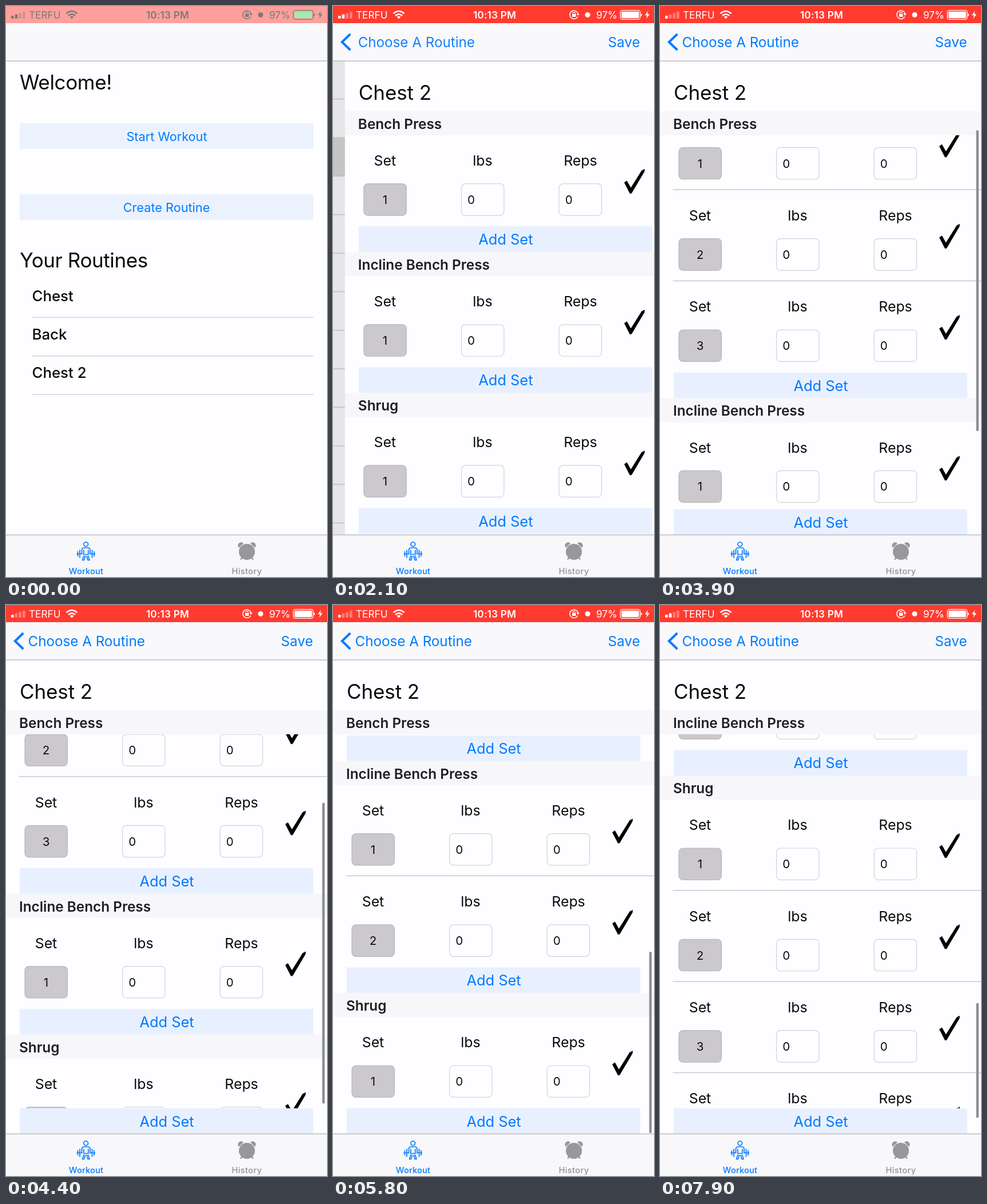
Animation, 561 px wide and 998 px high, one loop 8000 ms. Source, as an HTML page:

```html
<!DOCTYPE html>
<html lang="en">
<head>
<meta charset="utf-8">
<title>Workout tracker</title>
<style>
  html, body { margin: 0; width: 100%; height: 100%; overflow: hidden; background: #fefdff; }
  svg { display: block; }
  #stage { position: absolute; left: 0; top: 0; }
  text { font-family: Inter, Roboto, "Liberation Sans", sans-serif; white-space: pre; }
</style>
</head>
<body>
<svg id="stage" width="561" height="998" viewBox="0 0 561 998"></svg>
<script>
const W = 561, LOOP = 8000, STEP = 100;
const PAGE = '#fefdff', TINT = '#007aff', INK = '#0a0a0c', LINE = '#d3d2d6', BAR = '#f9f8fb';

// markup helpers
const text = (s, x, y, size, o = {}) =>
  `<text x="${x}" y="${y}" font-size="${size}" fill="${o.fill || INK}" font-weight="${o.weight || 400}"` +
  ` text-anchor="${o.anchor || 'start'}" letter-spacing="${o.gap || 0}"${o.id ? ` id="${o.id}"` : ''}>${s}</text>`;
const rect = (x, y, w, h, fill, extra = '') =>
  `<rect x="${x}" y="${y}" width="${w}" height="${h}" fill="${fill}" ${extra}/>`;
const rule = (x, y, x2 = W, color = LINE) => rect(x, y - 0.75, x2 - x, 1.5, color);
const group = (id, body, extra = '') => `<g id="${id}" ${extra}>${body}</g>`;
const mid = { anchor: 'middle' };
const blueMid = { anchor: 'middle', fill: TINT };

// timing helpers
const clamp = (v, a, b) => Math.min(b, Math.max(a, v));
const ease = k => k * k * (3 - 2 * k);
const ramp = (t, start, dur) => ease(clamp((t - start) / dur, 0, 1));
const push = (t, start) => {
  const x = Math.max(0, t - start) * 0.017;
  const p = 1 - (1 + x) * Math.exp(-x);
  return p > 0.995 ? 1 : p;
};
const along = (keys, t) => {
  if (t <= keys[0][0]) return keys[0][1];
  for (let i = 1; i < keys.length; i++) {
    const [a, u] = keys[i - 1], [b, v] = keys[i];
    if (t <= b) return u + (v - u) * (t - a) / (b - a);
  }
  return keys[keys.length - 1][1];
};

// status bar
function status(id, back, ink, fill) {
  const bars = [0, 1, 2, 3].map(i =>
    rect(9 + i * 6.7, 17 - i * 2.4, 4.6, 5 + i * 2.4, ink, `rx="1" class="bar${i}" opacity="${i < 2 ? 1 : 0.35}"`)).join('');
  const wifi = `<g fill="none" stroke="${ink}" stroke-width="2.6">
    <path d="M105.5 13.2Q115 4.8 124.500 13.2"/><path d="M109 17Q115 11.600 121 17"/></g>
    <path d="M111.600 19Q115 16 118.400 19L115 22.500Z" fill="${ink}"/>`;
  const lock = `<path d="M427.600 18.500A7.200 7.200 0 1 1 428.200 14" fill="none" stroke="${ink}" stroke-width="1.500"/>
    <path d="M425.500 13.500h5.200l-2.600 3.600z" fill="${ink}"/>${rect(418, 14, 6.4, 5, ink)}
    <path d="M419.300 14v-1.500a1.900 1.900 0 0 1 3.800 0v1.500" fill="none" stroke="${ink}" stroke-width="1.200"/>`;
  const battery = rect(502.2, 7.700, 34.600, 15.600, 'none', `rx="3.500" stroke="${ink}" stroke-width="1.300"`) +
    rect(504.2, 9.800, 30.600, 11.400, fill, 'rx="1.800"') +
    `<path d="M538 13q2 .5 2 2.500t-2 2.500z" fill="${ink}"/><path d="M550.500 8.500l-5.500 7.800h3.800l-1.400 6 5.800-8h-3.900z" fill="${ink}"/>`;
  return group(id, rect(0, 0, W, 30, back) + bars +
    text('TERFU', 40, 21.7, 17.2, { fill: ink }) + wifi +
    text('10:13 PM', 282.5, 21.7, 17.2, { fill: ink, weight: 600, anchor: 'middle', gap: 0.2 }) + lock +
    `<circle cx="445" cy="15.5" r="4.500" fill="${ink}"/>` +
    text('97%', 460, 21.7, 17.2, { fill: ink }) + battery);
}

// screens
const names = ['Chest', 'Back', 'Chest 2'];
const home = rect(0, 96, W, 829, PAGE) +
  text('Welcome!', 24, 145.5, 35, { gap: -0.35 }) +
  rect(24, 205, 513, 45, '#ebf2fe') + text('Start Workout', 281, 236, 21.7, { ...blueMid, id: 'start' }) +
  rect(24, 329, 513, 45, '#ebf2fe') + text('Create Routine', 280.5, 360, 21.7, blueMid) +
  text('Your Routines', 24, 456.7, 35, { gap: -0.4 }) +
  names.map((s, i) => text(s, 45.5, 515.5 + i * 67.3, 25.8, { weight: 500 }) + rule(46, 544.3 + i * 67.3, 537)).join('') +
  rect(0, 96, W, 829, '#000', 'id="dim1" opacity="0"');

const list = rect(0, 96, W, 829, PAGE) +
  rect(0, 230.5, W, 66.5, '#d9d9d9', 'id="picked"') +
  names.map((s, i) => text(s, 33, 137.2 + i * 67.35, 24.4)).join('') +
  Array.from({ length: 12 }, (_, i) => rule(33, 162.6 + i * 67.35)).join('') +
  rect(0, 96, W, 829, '#000', 'id="dim2" opacity="0"');

// workout table: adds are the times a set is appended
const TOP = 184, VIEW = 740.5, HEAD = 41.9, ROW = 159.35, FOOT = 44.88;
const sections = [
  { name: 'Bench Press', adds: [2900, 3300] },
  { name: 'Incline Bench Press', adds: [4700] },
  { name: 'Shrug', adds: [6000, 6400, 7000] },
];
const field = (x, fill, stroke) => rect(x, 84.8, 74.4, 55.4, fill, `rx="7" stroke="${stroke}" stroke-width="1.200"`);
const setRow = (s, i) => group(`row${s}_${i}`,
  text('Set', 70, 53.2, 24.8, mid) + text('lbs', 240.5, 53.2, 24.8, mid) + text('Reps', 411.5, 53.2, 24.8, mid) +
  field(33, '#cbc9cc', '#b9b7ba') + field(203.6, PAGE, '#d3d2d5') + field(374.2, PAGE, '#d3d2d5') +
  text(i + 1, 70, 120, 20.5, mid) + text('0', 214.2, 120, 20.5) + text('0', 384.8, 120, 20.5) +
  '<path d="M488 82.500L492.800 79.300L499.700 91.500L518.500 61.500L524 58.800L523.500 63.500L501 101.500L498 102Z" fill="#000"/>' +
  group(`line${s}_${i}`, rule(22.5, ROW - 0.8, W, '#c9c8cc')));
const head = (s, i) => group(`head${i}`, rect(0, 0, W, HEAD, '#f7f6f9') +
  text(s.name, 23, 30.8, 24.3, { weight: 600, fill: '#1f1e22' }));
const foot = i => group(`foot${i}`, rect(24, 0, 513, FOOT, '#e8f0ff') +
  text('Add Set', 281, 32, 25.4, { ...blueMid, id: `add${i}` }));

const workout = rect(0, 96, W, 829, PAGE) + text('Chest 2', 24, 163.5, 35, { gap: -0.1 }) +
  `<svg x="0" y="${TOP}" width="${W}" height="${VIEW}" overflow="hidden">` +
  sections.map((s, i) => Array.from({ length: s.adds.length + 1 }, (_, r) => setRow(i, r)).join('')).join('') +
  sections.map((s, i) => foot(i)).join('') + sections.map(head).join('') +
  rect(552.6, 0, 4.4, 100, '#8e8d91', 'id="thumb" rx="2.200"') + '</svg>';

// navigation and tab bars
const title = 'Choose A Routine';
const nav = rect(0, 30, W, 66, BAR) + rule(0, 96, W, '#bdbcc0') +
  group('chevron', `<path d="M30.300 49L15.800 63L30.300 77" fill="none" stroke="${TINT}" stroke-width="4"/>`) +
  group('back', text('Back', 38.5, 71.8, 24.2, { fill: TINT })) +
  group('title', text(title, 281.5, 71.8, 24.2, { weight: 600, anchor: 'middle' })) +
  group('backTitle', text(title, 38.5, 71.8, 24.2, { fill: TINT })) +
  group('save', text('Save', 536.5, 71.8, 24.2, { fill: TINT, anchor: 'end' }));

const lifter = `<g fill="none" stroke="${TINT}" stroke-width="1.700" stroke-linecap="round" stroke-linejoin="round">
  <circle cx="139.700" cy="940.800" r="3.800"/>
  <path d="M132.500 958v-7q0-4 4-4h6.500q4 0 4 4v7M135.800 951v7.500h8v-7.500M124 957.500h8M147.500 957.500h8
    M125.500 953.500v8M129 951v13M150.500 951v13M154 953.500v8M136 961l-2.500 7.500h3l2-7M143.500 961l2.500 7.500h-3l-2-7"/></g>`;
const clock = `<g fill="#98979b"><circle cx="421" cy="954" r="14"/>
  <path d="M407 947a5 5 0 0 1 8-8zM435 947a5 5 0 0 0-8-8z"/></g>
  <path d="M413 964l-3 3.500M429 964l3 3.500" stroke="#98979b" stroke-width="2.400"/>`;
const tabs = rect(0, 924.5, W, 73.5, '#f8f7fa') + rule(0, 924.4, W, '#bdbcc0') + lifter + clock +
  text('Workout', 140, 993, 14.6, { ...blueMid, weight: 500, gap: 0.2 }) +
  text('History', 421, 993, 14.6, { anchor: 'middle', fill: '#929196', weight: 500, gap: 0.4 });

const stage = document.getElementById('stage');
stage.innerHTML = group('home', home) + group('list', list) + group('workout', workout) +
  nav + tabs + status('idle', '#fefdff', '#000', '#4cd964') + status('live', '#ff3b30', '#fff', '#fff');

const el = {};
stage.querySelectorAll('[id]').forEach(n => el[n.id] = n);
const weakBars = stage.querySelectorAll('.bar1');
const move = (id, x, y = 0) => el[id].setAttribute('transform', `translate(${x.toFixed(2)} ${y.toFixed(2)})`);
const fade = (id, v) => {
  el[id].setAttribute('opacity', v.toFixed(3));
  el[id].style.display = v > 0 ? '' : 'none';
};

const scrollKeys = [[3700, 0], [4000, 95], [4200, 180], [4400, 244], [4600, 295], [4700, 317], [4900, 317],
  [5200, 424], [5400, 465], [5600, 476], [7300, 476], [7500, 570], [7700, 745], [7900, 856]];
const thumbAlpha = [[3700, 0], [3800, 1], [5800, 1], [6100, 0], [7300, 0], [7400, 1]];
const thumbLength = [[4700, 526], [5000, 317], [6000, 317], [7100, 201]];

function drawTable(t) {
  const scroll = along(scrollKeys, t);
  let y = -scroll;
  sections.forEach((s, i) => {
    const shown = [1, ...s.adds.map(a => ramp(t, a, 250))];
    const count = shown.reduce((a, b) => a + b);
    const size = HEAD + count * ROW + FOOT;
    shown.forEach((v, r) => {
      move(`row${i}_${r}`, 0, y + HEAD + r * ROW);
      fade(`row${i}_${r}`, v);
      fade(`line${i}_${r}`, shown[r + 1] || 0);
    });
    // headers stick to the top edge, footers to the bottom one
    move(`head${i}`, 0, clamp(0, y, y + size - HEAD));
    move(`foot${i}`, 0, clamp(VIEW - FOOT, y + HEAD, y + size - FOOT));
    fade(`add${i}`, s.adds.some(a => t >= a && t < a + 100) ? 0.3 : 1);
    y += size;
  });
  const len = along(thumbLength, t);
  const left = Math.max(0, y - VIEW);
  el.thumb.setAttribute('height', len);
  move('thumb', 0, VIEW - 1.5 - left * len / VIEW - len);
  fade('thumb', along(thumbAlpha, t));
}

function draw(t) {
  const a = push(t, 950), b = push(t, 1800);

  move('home', -0.3 * W * a);
  move('list', W * (1 - a) - 0.3 * W * b);
  move('workout', W * (1 - b));
  fade('home', a < 1 ? 1 : 0);
  fade('list', a > 0 && b < 1 ? 1 : 0);
  fade('workout', b > 0 ? 1 : 0);
  fade('dim1', 0.1 * a);
  fade('dim2', 0.1 * b);
  fade('start', t < 950 ? 1 : 0.25 + 0.75 * ramp(t, 1000, 200));
  fade('picked', t >= 1700 ? 1 : 0);

  fade('chevron', a);
  move('back', 190 * (1 - a) - 80 * b);
  fade('back', a * clamp(1 - 2 * b, 0, 1));
  move('title', 270 * (1 - a) - 140 * b);
  fade('title', a * clamp(1 - 1.6 * b, 0, 1));
  move('backTitle', 138 * (1 - b));
  fade('backTitle', clamp(1.6 * b - 0.6, 0, 1));
  fade('save', b);

  drawTable(t);

  fade('live', along([[0, 0.48], [300, 1]], t));
  const weak = t >= 3800 && t < 7000;
  weakBars.forEach(n => n.setAttribute('opacity', weak ? 0.35 : 1));
}

const began = performance.now();
function tick() {
  const t = (performance.now() - began) % LOOP;
  draw(Math.floor(t / STEP) * STEP);
  requestAnimationFrame(tick);
}
tick();
</script>
</body>
</html>
```
